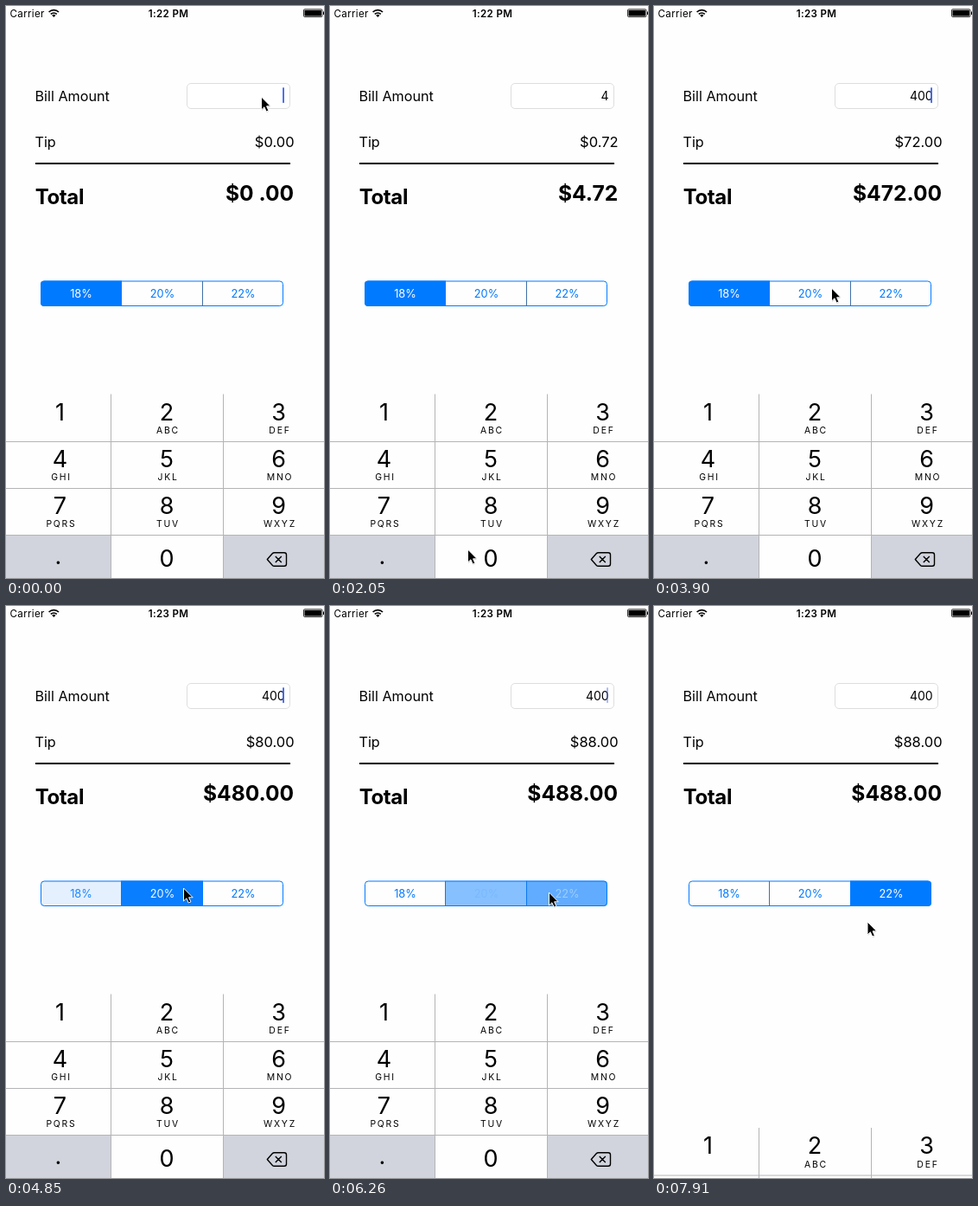
Write an HTML page that moves like this. It is 368 by 661 pixels and loops after 7.99 s.

```html
<!DOCTYPE html>
<html lang="en">
<head>
<meta charset="utf-8">
<title>Tip calculator</title>
<style>
  html, body { margin: 0; width: 100%; height: 100%; overflow: hidden; background: #fefefe; }
  svg { display: block; width: 368px; height: 661px; font-family: Inter, Roboto, sans-serif; font-optical-sizing: none; }
  .status { font-size: 11.6px; letter-spacing: .33px; }
  .label { font-size: 16.2px; }
  .value { font-size: 16.5px; text-anchor: end; }
  .total { font-size: 24.6px; font-weight: 700; }
  .segment { font-size: 12.8px; text-anchor: middle; }
  .digit { font-size: 27px; text-anchor: middle; }
  .letters { font-size: 10.4px; letter-spacing: 1.8px; text-anchor: middle; }
</style>
</head>
<body>
<svg viewBox="0 0 368 661">
  <text class="status" x="4.5" y="12.5">Carrier</text>
  <g fill="none" stroke="#000" stroke-width="1.7">
    <path d="M49.6 7a8.2 8.2 0 0 1 11.4 0M51.8 9.4a5.2 5.2 0 0 1 7 0"/>
    <path d="M55.3 13l-2.1-2.2a3 3 0 0 1 4.2 0z" fill="#000" stroke="none"/>
  </g>
  <text id="clock" class="status" x="188" y="12.5" font-weight="600" text-anchor="middle"></text>
  <rect x="344.5" y="3.8" width="21.5" height="8.8" rx="1.2" fill="none" stroke="#000" stroke-width=".8"/>
  <rect x="345.5" y="4.8" width="19.5" height="6.8"/>
  <path d="M367 6.5h1v3.5h-1z"/>

  <text class="label" x="33.5" y="109.6">Bill Amount</text>
  <rect x="209.5" y="89.5" width="119" height="29" rx="4.5" fill="#fff" stroke="#dedede"/>
  <text id="bill" x="322.6" y="108.5" font-size="14" text-anchor="end"></text>
  <rect id="caret" x="320.1" y="94.3" width="1.9" height="17.6" fill="#426bf2"/>
  <text class="label" x="33.5" y="162.6">Tip</text>
  <text id="tip" class="value" x="333.6" y="162.6"></text>
  <path d="M34 181h295v2H34z"/>
  <text class="total" x="33.8" y="229" style="font-size:24px;letter-spacing:-.4px">Total</text>
  <text id="total" class="total" x="333.2" y="224.7" text-anchor="end"></text>

  <clipPath id="pill"><rect x="40" y="317.5" width="281" height="29.5" rx="4"/></clipPath>
  <path d="M133.5 318v29M227.5 318v29" stroke="#3f6fa8"/>
  <g id="segments" clip-path="url(#pill)"></g>
  <rect x="40.5" y="318" width="280" height="28.5" rx="3.7" fill="none" stroke="#007aff"/>

  <g id="keyboard">
    <path d="M0 611h121.500v51H0zM251.500 611H368v51H251.500z" fill="#d1d4dc"/>
    <rect id="key4" y="503.500" width="121.500" height="54" fill="#d1d4dc"/>
    <rect id="key0" x="121.500" y="611.500" width="130" height="51" fill="#d1d4dc"/>
    <path d="M121.500 448.500V661M251.500 448.500V661M0 503.500H368M0 557.500H368M0 611.500H368" stroke="#b4b4b6"/>
    <g id="keys"></g>
    <path d="M302.300 639.500l5.900-6.700q1-1.100 2.300-1.100h11.500q2.500 0 2.500 2.500v10.600q0 2.500-2.500 2.500h-11.500q-1.300 0-2.300-1.100zM311.800 636l7 7m0-7l-7 7"
      fill="none" stroke="#000" stroke-width="1.4" stroke-linejoin="round"/>
  </g>

  <g id="pointer">
    <path d="M1 2v14.500l3.300-3.100 2.300 5.200 2.400-1-2.300-5h4.300z" opacity=".18"/>
    <path d="M.5 .5v15l3.400-3.200 2.300 5.200 2.700-1.100-2.300-5.100h4.600z" stroke="#fff"/>
  </g>
</svg>
<script>
const LOOP = 7990;
const $ = id => document.getElementById(id);
const easeInOut = u => u * u * (3 - 2 * u);
const easeOut = u => 1 - (1 - u) ** 2;

// Value at time t along [time, value] points.
function track(points, t) {
  let [t0, v0] = points[0];
  for (const [t1, v1] of points) {
    if (t < t1) return v0 + (v1 - v0) * Math.max(0, (t - t0) / (t1 - t0));
    [t0, v0] = [t1, v1];
  }
  return v0;
}
const between = (t, a, b) => t >= a && t < b;

// Keypad
const columns = [62.5, 186, 315.500];
const letters = ["", "ABC", "DEF", "GHI", "JKL", "MNO", "PQRS", "TUV", "WXYZ"];
$("keys").innerHTML = letters.map((word, i) => {
  const x = columns[i % 3], y = 478.8 + 54 * Math.floor(i / 3);
  return `<text class="digit" x="${x}" y="${y}">${i + 1}</text>
    <text class="letters" x="${x + 1.5}" y="${y + 15.4}">${word}</text>`;
}).join("") +
  `<text class="digit" x="60.5" y="645">.</text><text class="digit" x="186" y="648">0</text>`;

// Segmented control
const rates = [18, 20, 22];
$("segments").innerHTML = rates.map((rate, i) =>
  `<rect x="${[40, 133, 227][i]}" y="317" width="${[94, 95, 94][i]}" height="30" fill="#007aff"/>
   <text class="segment" x="${[87, 181, 274.5][i]}" y="336.6">${rate}%</text>`).join("");
const fills = [...$("segments").querySelectorAll("rect")];
const captions = [...$("segments").querySelectorAll("text")];
const selection = [
  [[0, 1], [4730, 1], [4865, 0]],
  [[4665, 0], [4675, .12], [4730, .12], [4856, 1], [6190, 1], [6325, 0]],
  [[6080, 0], [6090, .12], [6190, .12], [6316, 1]]
];

// Each move: start, end, from, to, easing
const moves = [
  [540, 1090, [295, 104.500], [72, 549.500], easeInOut],
  [1660, 2050, [72, 549.500], [159, 627.500], easeInOut],
  [3560, 3900, [159, 627.500], [205, 325.500], easeInOut],
  [5480, 5950, [205, 325.500], [253, 330.500], easeInOut],
  [7000, 7370, [253, 330.500], [246.5, 364.500], easeOut]
];
function pointerAt(t) {
  const [start, end, from, to, ease] = moves.findLast(m => t >= m[0]) || moves[0];
  const u = ease(Math.min(1, Math.max(0, (t - start) / (end - start))));
  return from.map((v, i) => v + (to[i] - v) * u);
}

// Caret fades at alternate off/on times, with hard resets when typing.
const FADE = 115;
function caretAt(t) {
  if (t >= 7790) return 0;
  if (between(t, 1210, 1630) || between(t, 2230, 3210)) return 1;
  const toggles = [50, 500, 1050, 1210, 1630, 2230, 3210, 3610, 4200, 4610, 5200, 5610, 6200, 6610, 7100, 7610];
  const i = toggles.findLastIndex(time => t >= time);
  if (i < 0) return 1;
  const u = Math.min(1, (t - toggles[i]) / FADE);
  return i % 2 ? u : 1 - u;
}

function draw(t) {
  const bill = t < 1210 ? 0 : t < 2290 ? 4 : t < 2610 ? 40 : 400;
  const rate = rates[t < 4735 ? 0 : t < 6195 ? 1 : 2];
  const tip = bill * rate / 100;
  $("clock").textContent = t < 2730 ? "1:22 PM" : "1:23 PM";
  $("bill").textContent = bill || "";
  $("tip").textContent = "$" + tip.toFixed(2);
  $("total").textContent = bill ? "$" + (bill + tip).toFixed(2) : "$0 .00";
  $("caret").setAttribute("opacity", caretAt(t));

  selection.forEach((points, i) => {
    const a = track(points, t);
    fills[i].setAttribute("opacity", a);
    captions[i].setAttribute("fill", `rgb(${255 * a},${122 + 133 * a},255)`);
  });

  $("key4").setAttribute("opacity", +between(t, 1090, 1330));
  $("key0").setAttribute("opacity", +(between(t, 2230, 2350) || between(t, 2540, 2670)));

  const slide = Math.min(1, Math.max(0, (t - 7790) / 400));
  const drop = Math.min(154.5, 213 * (1 - (1 - slide) ** 3.67));
  $("keyboard").setAttribute("transform", `translate(0 ${drop})`);
  $("pointer").setAttribute("transform", `translate(${pointerAt(t)})`);
}

function frame() {
  draw(performance.now() % LOOP);
  requestAnimationFrame(frame);
}
frame();
</script>
</body>
</html>
```
